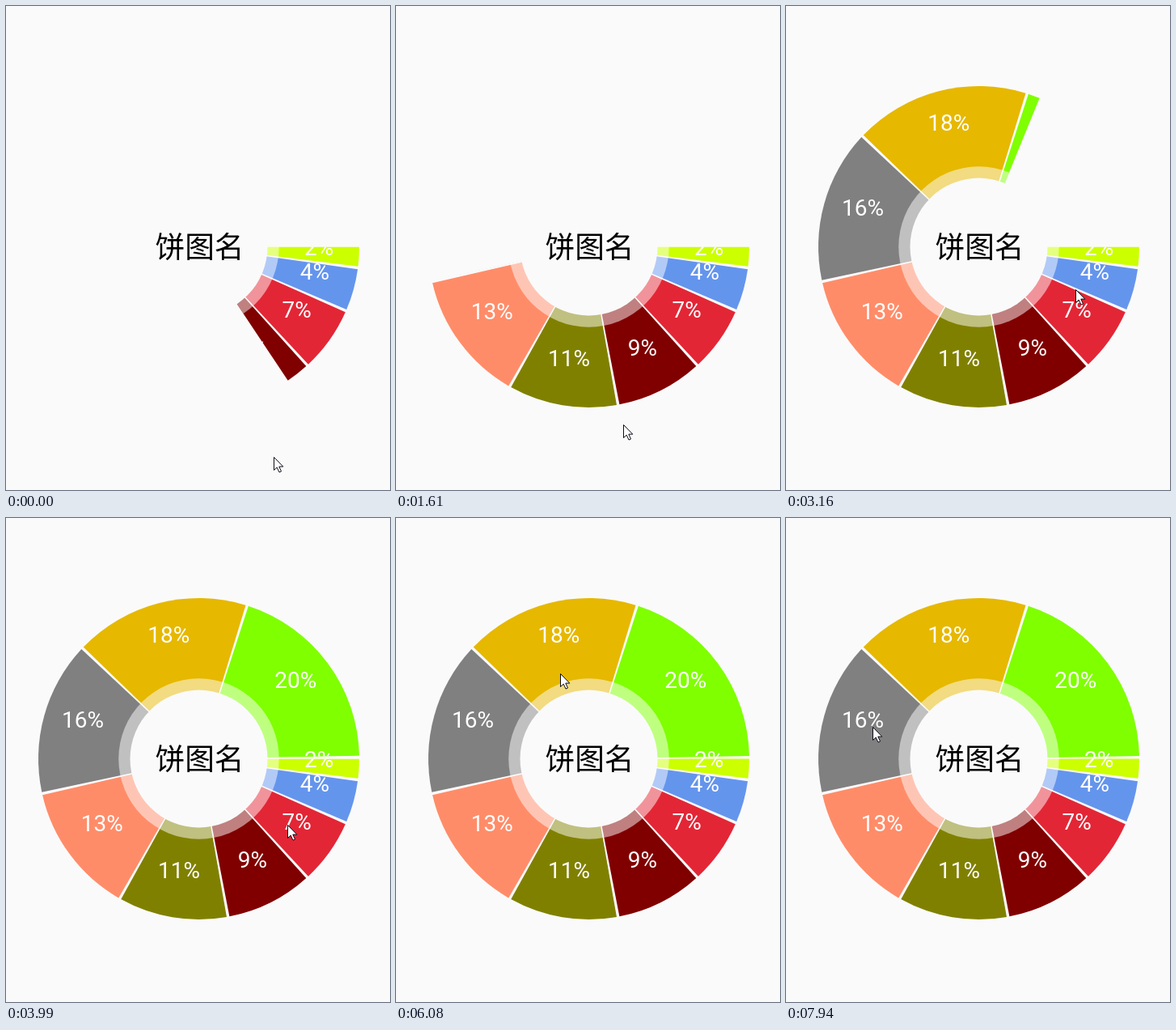
An HTML page with a canvas that plays this animation: 475x598 px, repeating every 8 s.

```html
<!DOCTYPE html>
<html lang="zh">
<head>
<meta charset="utf-8">
<title>饼图名</title>
<style>
html, body { margin: 0; width: 100%; height: 100%; overflow: hidden; background: #fafafa; }
canvas { display: block; }
</style>
</head>
<body>
<canvas id="stage" width="475" height="598"></canvas>
<script>
const stage = document.getElementById('stage');
const ctx = stage.getContext('2d');
const LOOP = 8000, FIRST = 120, TICK = 136.8; // the picture refreshes once per tick
const CX = 238.5, CY = 297.5;
const OUTER = 198.5, RING = OUTER / 2, HOLE = 85;
const LABEL_R = (OUTER + RING) / 2;
const UNIT = 8, GAP = 1; // degrees per value, gap after each slice
const BACK = '#fafafa';
const COLORS = ['#ccff00', '#6495ed', '#e32636', '#800000', '#808000',
  '#ff8c69', '#808080', '#e6b800', '#7fff00'];

// Key points: [tick, swept degrees] and [tick, x, y]
const SWEEP = [[-1, 56.3], [6, 129.3], [16, 225.6], [29, 370]];
const POINTER = [[8, 331, 557], [16, 130, 398], [22, 358, 350], [30, 345, 388],
  [34, 445, 180], [37, 351, 230], [40, 82, 79], [46, 323, 305],
  [50, 406, 305], [54, 20, 200], [57, 107, 258]];

const ARROW = new Path2D('M0 0V16L3.7 12.6L6.5 18.6L9 17.5L6.3 11.6H11.3Z');

const rad = deg => deg * Math.PI / 180;

// Linear path through key points, resting before the first and after the last
function track(keys, tick) {
  const i = keys.findIndex(k => k[0] > tick);
  if (i === 0) return keys[0].slice(1);
  if (i < 0) return keys[keys.length - 1].slice(1);
  const a = keys[i - 1], b = keys[i];
  const p = (tick - a[0]) / (b[0] - a[0]);
  return a.slice(1).map((v, j) => v + (b[j + 1] - v) * p);
}

function wedge(r, from, to) {
  ctx.beginPath();
  ctx.moveTo(CX, CY);
  ctx.arc(CX, CY, r, rad(from), rad(to));
  ctx.closePath();
}

function disc(r, color) {
  ctx.fillStyle = color;
  ctx.beginPath();
  ctx.arc(CX, CY, r, 0, Math.PI * 2);
  ctx.fill();
}

function drawPie(sweep) {
  ctx.save();
  if (sweep < 360) {
    wedge(400, 0, sweep);
    ctx.clip();
  }
  const labels = [];
  let start = 0;
  COLORS.forEach((color, i) => {
    const size = UNIT * (i + 1), end = start + size - GAP;
    wedge(OUTER, start, end);
    ctx.fillStyle = color;
    ctx.fill();
    labels.push([Math.round(size / 3.6) + '%', rad((start + end) / 2)]);
    start += size;
  });
  disc(RING, 'rgba(255,255,255,0.5)');
  ctx.fillStyle = '#fff';
  ctx.font = '28px Roboto, sans-serif';
  for (const [text, a] of labels)
    ctx.fillText(text, CX + LABEL_R * Math.cos(a), CY + 1 + LABEL_R * Math.sin(a));
  ctx.restore();
  disc(HOLE, BACK);
}

function drawPointer(x, y) {
  ctx.save();
  ctx.translate(Math.round(x) + 0.5, Math.round(y) + 0.5);
  ctx.fillStyle = '#fff';
  ctx.fill(ARROW);
  ctx.strokeStyle = '#0c0c18';
  ctx.stroke(ARROW);
  ctx.restore();
}

function draw(time) {
  const tick = Math.floor((time % LOOP - FIRST) / TICK);
  ctx.fillStyle = BACK;
  ctx.fillRect(0, 0, stage.width, stage.height);
  ctx.textAlign = 'center';
  drawPie(track(SWEEP, tick)[0]);
  ctx.fillStyle = '#000';
  ctx.font = '36.7px "Noto Sans CJK SC", "Noto Sans CJK", sans-serif';
  ctx.fillText('饼图名', CX + 1, 311);
  drawPointer(...track(POINTER, tick));
}

const origin = performance.now();
function frame() {
  draw(performance.now() - origin);
  requestAnimationFrame(frame);
}
frame();
</script>
</body>
</html>
```
